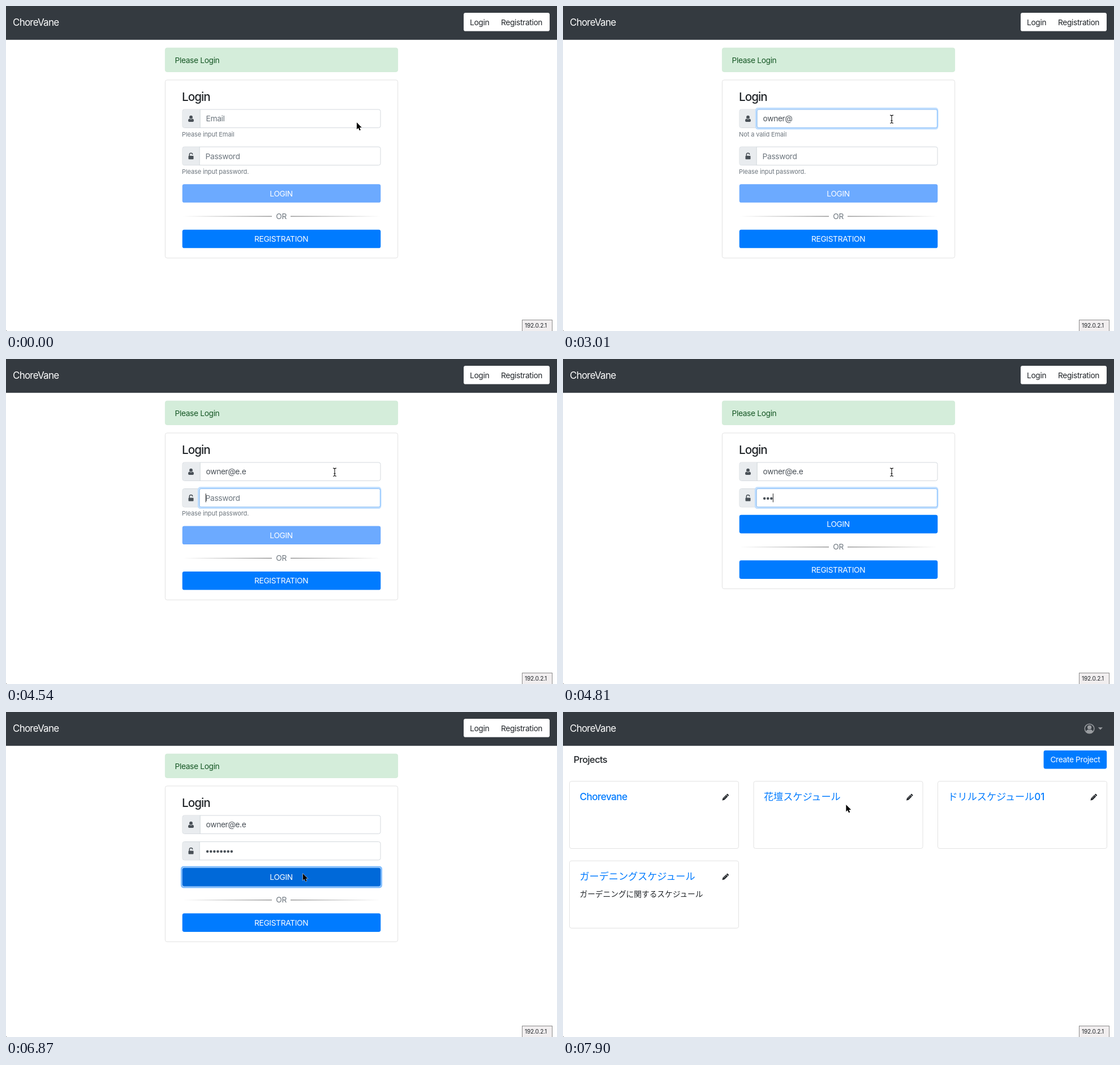
Animation of 974 by 575 pixels, one loop 7990 ms. Source, as an HTML page:

```html
<!DOCTYPE html>
<html lang="ja">
<head>
<meta charset="utf-8">
<title>Login demo</title>
<style>
  html, body { margin: 0; width: 100%; height: 100%; overflow: hidden; background: #fff; }
  svg { display: block; width: 100%; height: 100%; }
  text {
    font: 400 13.76px Inter, "Noto Sans CJK JP", "Noto Sans CJK", sans-serif;
    letter-spacing: -.025em; fill: #212529; white-space: pre;
  }
  .brand { font-size: 17px; letter-spacing: -.045em; fill: #fff; }
  .head { font-size: 20.6px; font-weight: 500; letter-spacing: -.045em; }
  .sub { font-size: 16.4px; font-weight: 500; letter-spacing: -.035em; }
  .small { font-size: 11px; letter-spacing: -.01em; fill: #6c757d; }
  .muted { fill: #6c757d; }
  .typed { fill: #495057; }
  .ok { fill: #155724; }
  .btn { fill: #fff; text-anchor: middle; }
  .link { font-size: 17.2px; font-weight: 500; letter-spacing: -.035em; fill: #007bff; }
  .ja { font-weight: 400; letter-spacing: -.005em; }
  .ja tspan { font-weight: 500; }
  .tip { font-size: 10.2px; letter-spacing: -.02em; }
</style>
</head>
<body>
<svg id="stage" viewBox="0 0 974 575" preserveAspectRatio="none"></svg>
<script>
const LOOP = 7990;
const SHIFT = 19.7;
const BLUE = '#007bff';

const text = (x, y, s, cls = '', id = '') =>
  `<text x="${x}" y="${y}" class="${cls}" ${id && `id="${id}"`}>${s}</text>`;

const box = (x, y, w, h, attrs) =>
  `<rect x="${x}" y="${y}" width="${w}" height="${h}" rx="3.4" ${attrs}/>`;

const outline = 'fill="#fff" stroke="#dfdfdf" stroke-width=".9"';

const field = (id, y, split, icon) => `
  ${box(312, y, 350, 32.4, 'fill="#fff" stroke="#ced4da" stroke-width=".9"')}
  <path d="M${split} ${y + .4}H315.4Q312.4 ${y + .4} 312.4 ${y + 3.4}V${y + 29}Q312.4 ${y + 32} 315.4 ${y + 32}H${split}Z" fill="#e9ecef"/>
  <path d="M${split} ${y}V${y + 32.4}" stroke="#ced4da" stroke-width=".9"/>
  <g transform="translate(327 ${y + 16.5})" fill="#495057">${icon}</g>
  <g id="${id}Ring" fill="none">
    ${box(split - 2, y - 1.8, 664 - split, 36, 'stroke="#bfdeff" stroke-width="2.75"')}
    ${box(split - .4, y, 662.4 - split, 32.4, 'stroke="#80bdff" stroke-width=".9"')}
  </g>`;

const userIcon = `<circle cy="-2.8" r="2.9"/>
  <path d="M-5 3.2Q-5 .2-2.6 0Q0 1.8 2.6 0Q5 .2 5 3.2Q5 5.6 3 5.6H-3Q-5 5.6-5 3.2Z"/>`;
const lockIcon = `<rect x="-4.5" y="-.6" width="9" height="6.2" rx="1"/>
  <path d="M-2.7 0V-2.6A2.7 2.7 0 0 1 2.7-2.8" fill="none" stroke="#495057" stroke-width="1.5"/>`;

const caret = id => `<path id="${id}" d="M0 0V15.4" stroke="#222" stroke-width="1"/>`;

const pencil = (x, y) => `<g transform="translate(${x} ${y}) rotate(45)" fill="#212529">
  <path d="M-2.1-4.3H2.1V4L0 7.6L-2.1 4Z"/><path d="M-2.1-5V-6.4Q-2.1-7.3-1.2-7.3H1.2Q2.1-7.3 2.1-6.4V-5Z"/>
  <path d="M-.5-3.4V3.4" stroke="#fff" stroke-width=".5"/></g>`;

const project = (x, y, title, cls = 'link ja') =>
  box(x, y, 299, 119, outline) + text(x + 18, y + 33.5, title, cls) + pencil(x + 275.3, y + 28.6);

const dots = Array.from({ length: 8 }, (_, i) =>
  `<circle class="dot" cx="${356.1 + 6.1 * i}" cy="266.5" r="2.25" fill="#495057"/>`).join('');

const login = `<g id="login">
  ${box(809, 12, 152, 32.6, 'fill="#fff"')}
  ${text(820, 33.7, 'Login')}${text(875, 33.7, 'Registration')}
  ${box(281.4, 74.2, 411.2, 42.2, 'fill="#d4edda" stroke="#cde9d4" stroke-width=".8"')}
  ${text(298.5, 100.6, 'Please Login', 'ok')}
  <rect id="card" x="281.4" y="130.9" width="411.2" height="315" rx="3.4" ${outline}/>
  ${text(311, 168.3, 'Login', 'head')}
  ${field('mail', 183, 343.2, userIcon)}
  ${text(353.6, 204.4, 'Email', 'muted', 'mailHint')}
  ${text(353.6, 204.4, '', 'typed', 'mailText')}
  ${caret('mailCaret')}
  ${text(311, 231, '', 'small', 'mailNote')}
  <g id="pass">
    ${field('pass', 249.2, 342.2, lockIcon)}
    ${text(352.6, 270.5, 'Password', 'muted', 'passHint')}
    ${dots}${caret('passCaret')}
    ${text(311, 297.2, 'Please input password.', 'small', 'passNote')}
  </g>
  <g id="actions">
    ${box(310.3, 313.6, 353.4, 35.8, 'id="btnRing" fill="none" stroke="#80bdff" stroke-width="2.75"')}
    ${box(311.7, 315.2, 350.6, 32.6, 'id="btn"')}
    ${text(486.6, 336.5, 'LOGIN', 'btn')}
    <rect x="312" y="371.6" width="158" height="1" fill="url(#fadeIn)"/>
    <rect x="503" y="371.6" width="159" height="1" fill="url(#fadeOut)"/>
    <text x="486.6" y="376.9" text-anchor="middle" class="muted">OR</text>
    ${box(311.7, 395.7, 350.6, 32.6, `fill="${BLUE}"`)}
    ${text(486.6, 417, 'REGISTRATION', 'btn')}
  </g>
</g>`;

const board = `<g id="board">
  <g fill="#999ca0">
    <circle cx="930.6" cy="29.5" r="8.3" fill="none" stroke="#999ca0" stroke-width="1.5"/>
    <circle cx="930.6" cy="27.2" r="3.6"/>
    <path d="M924.4 35Q925.4 31.4 928.4 31Q930.6 32.2 932.8 31Q935.8 31.4 936.8 35Q934 37.8 930.6 37.8T924.4 35Z"/>
    <path d="M945.8 27.3H954L949.9 31.4Z"/>
  </g>
  ${text(18.8, 90.3, 'Projects', 'sub')}
  ${box(849.6, 68, 111.6, 32.4, `fill="${BLUE}"`)}
  ${text(905.4, 89.3, 'Create Project', 'btn')}
  ${project(11.5, 122.5, 'Chorevane', 'link')}
  ${project(337, 122.5, '花壇スケジュール')}
  ${project(662.5, 122.5, 'ドリルスケジュール<tspan>01</tspan>')}
  ${project(11.5, 263.4, 'ガーデニングスケジュール')}
  ${text(29.5, 326.6, 'ガーデニングに関するスケジュール', 'ja')}
</g>`;

const pointer = `<g id="pointer">
  <circle id="click" cx="1" cy="-.6" r="8.8" fill="none" stroke="#111" stroke-width="1.2"/>
  <path id="arrow" d="M0 0V12.2L2.8 9.7L4.8 14.2L6.9 13.3L5 8.9H8.8Z" fill="#000" stroke="#fff" stroke-width="1" paint-order="stroke"/>
  <path id="beam" d="M-3-6.6Q0-6.6 0-4.8Q0-6.6 3-6.6M0-5V6.2M-3 7.6Q0 7.6 0 5.8Q0 7.6 3 7.6M-1.7 3H1.7" fill="none" stroke="#111" stroke-width="1.1"/>
</g>`;

const fade = (id, from, to) => `<linearGradient id="${id}">
  <stop stop-color="#666" stop-opacity="${from}"/><stop offset="1" stop-color="#666" stop-opacity="${to}"/></linearGradient>`;

document.getElementById('stage').innerHTML = `
  <defs>${fade('fadeIn', 0, 1)}${fade('fadeOut', 1, 0)}</defs>
  <rect width="974" height="575" fill="#fff"/>
  <rect width="974" height="59.8" fill="#343a40"/>
  ${text(12, 35.4, 'ChoreVane', 'brand')}
  ${login}${board}
  <rect x="912.5" y="555.5" width="53" height="22" fill="#f1eeef" stroke="#8b8b8b"/>
  ${text(917, 569.2, '192.0.2.1', 'tip')}
  <path d="M0 573Q0 575 2 575H0Z" fill="#555"/>
  ${pointer}`;

const el = {};
document.querySelectorAll('[id]').forEach(n => el[n.id] = n);
const dotList = [...document.querySelectorAll('.dot')];

// Tracks are [time, value...] rows; each value holds until the next row.
const moves = [
  [0, 620, 206, 'arrow'], [950, 609, 204, 'beam'], [1040, 590, 201, 'beam'], [1130, 581, 199.7, 'beam'],
  [5980, 578, 215.2, 'beam'], [6070, 567, 232, 'beam'], [6160, 556, 248, 'beam'], [6240, 546, 262, 'arrow'],
  [6330, 537, 273, 'arrow'], [6420, 529, 281, 'arrow'], [6510, 524.7, 285.8, 'arrow'],
  [7590, 453.5, 291, 'arrow'], [7730, 315, 250, 'arrow'], [7820, 410, 192, 'arrow'], [7900, 500.4, 164, 'arrow']
];
const MAIL = 'owner@e.e';
const mailKeys = [[0, 0], [1940, 1], [2030, 2], [2120, 3], [2200, 4], [2380, 5], [2470, 6], [3100, 7], [3280, 9]];
const passKeys = [[0, 0], [4630, 1], [4810, 3], [4990, 4], [5170, 5], [5260, 6], [5350, 7], [5530, 8]];
const notes = [[0, 'Please input Email'], [1940, 'Not a valid Email'], [3100, '']];
const mailFocus = [[0, 0], [1400, .1], [1490, 1], [3550, .8], [3640, .25], [3730, 0]];
const passFocus = [[0, 0], [3550, .2], [3640, .75], [3730, 1], [6690, .7], [6780, .15], [6870, 0]];
const btnFocus = [[0, 0], [6690, .3], [6780, .85], [6870, 1]];
const btnFill = [[0, '#6caaff'], [4630, BLUE], [6420, '#0074f0'], [6510, '#0069d9']];

const row = (track, t) => track.reduce((hit, r) => r[0] <= t ? r : hit);
const at = (track, t) => row(track, t)[1];
const within = (t, ...spans) => spans.some(([a, b]) => t >= a && t < b);
const show = (node, on) => node.style.display = on ? '' : 'none';
const move = (node, x, y) => node.setAttribute('transform', `translate(${x} ${y})`);

function render(t) {
  const onBoard = t >= 6960;
  show(el.login, !onBoard);
  show(el.board, onBoard);

  const [, x, y, shape] = row(moves, t);
  move(el.pointer, x, y);
  show(el.arrow, shape === 'arrow');
  show(el.beam, shape === 'beam');
  show(el.click, within(t, [630, 770], [1400, 1490], [6690, 6780]));
  if (onBoard) return;

  const typed = at(mailKeys, t);
  el.mailText.textContent = MAIL.slice(0, typed);
  show(el.mailHint, !typed);
  el.mailNote.textContent = at(notes, t);
  el.mailRing.style.opacity = at(mailFocus, t);
  show(el.mailCaret, within(t, [1400, 3010], [3100, 3550]));
  move(el.mailCaret, 354 + (typed ? el.mailText.getComputedTextLength() : 0), 191.4);

  const count = at(passKeys, t);
  dotList.forEach((d, i) => show(d, i < count));
  show(el.passHint, !count);
  show(el.passNote, !count);
  el.passRing.style.opacity = at(passFocus, t);
  show(el.passCaret, within(t, [3550, 4090], [4540, 6070]));
  move(el.passCaret, 353.2 + 6.05 * count, 257.7);

  const up = t >= 3100 ? SHIFT : 0;
  const total = up + (count ? SHIFT : 0);
  move(el.pass, 0, -up);
  move(el.actions, 0, -total);
  el.card.setAttribute('height', 315 - total);
  el.btn.setAttribute('fill', at(btnFill, t));
  el.btnRing.style.opacity = at(btnFocus, t);
}

const start = performance.now();
function tick() {
  render((performance.now() - start) % LOOP);
  requestAnimationFrame(tick);
}
tick();
</script>
</body>
</html>
```
